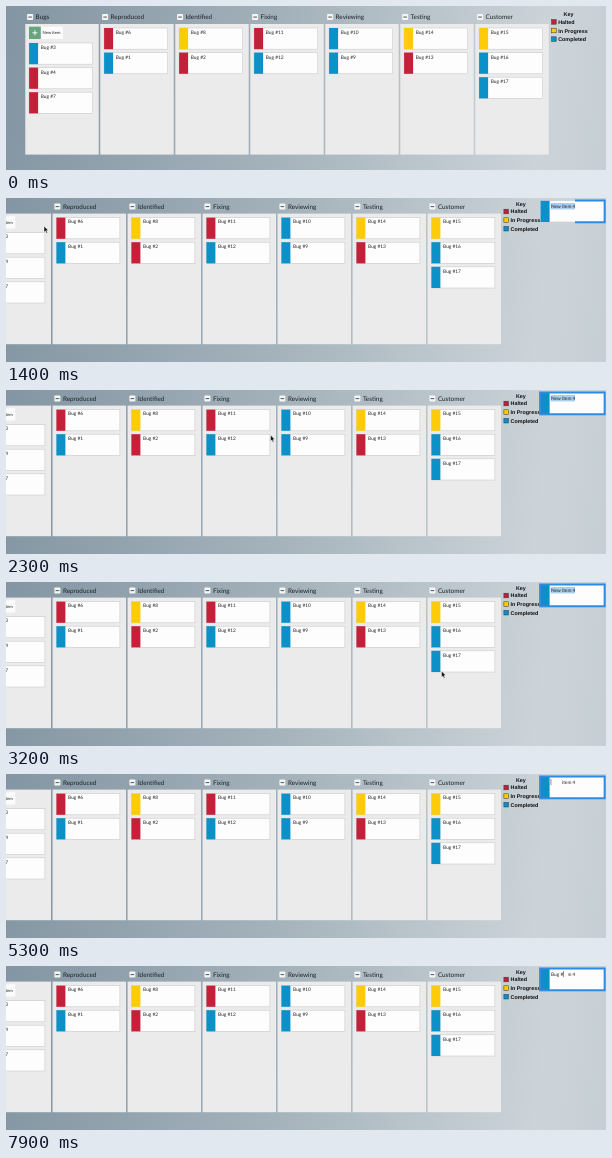
Animation, 600 px wide and 164 px high, one loop 8 s. Source, as an HTML page:

```html
<!DOCTYPE html>
<html lang="en">
<head>
<meta charset="utf-8">
<title>Bug board</title>
<style>
  html, body { margin: 0; width: 100%; height: 100%; overflow: hidden; }
  svg { display: block; width: 600px; height: 164px; }
  text { font-family: Lato, sans-serif; font-size: 4.8px; fill: #222; white-space: pre; text-rendering: geometricPrecision; }
  .head { font-size: 6.35px; fill: #1c2228; }
  .small { font-size: 4.2px; }
  .key { font: bold 5.4px "Liberation Sans", Arial, sans-serif; fill: #111; }
</style>
</head>
<body>
<svg id="stage" viewBox="0 0 600 164">
  <defs>
    <linearGradient id="sky" gradientUnits="userSpaceOnUse" x1="0" y1="30" x2="600" y2="100">
      <stop offset="0" stop-color="#8496a3"/>
      <stop offset=".45" stop-color="#a3b1ba"/>
      <stop offset=".9" stop-color="#ccd4d9"/>
      <stop offset="1" stop-color="#c6cfd4"/>
    </linearGradient>
    <clipPath id="rightPart"><rect x="569" y="0" width="31" height="30"/></clipPath>
  </defs>
  <rect width="600" height="164" fill="url(#sky)"/>
</svg>
<script>
const COLORS = { r: '#c5203a', y: '#fdcb08', b: '#0c90c8' };
const LOOP = 8000, STEP = 100;
const stage = document.getElementById('stage');

function add(parent, tag, attrs, content) {
  const node = document.createElementNS('http://www.w3.org/2000/svg', tag);
  for (const name in attrs) node.setAttribute(name, attrs[name]);
  if (content) node.textContent = content;
  return parent.appendChild(node);
}
const box = (parent, x, y, width, height, fill, more) =>
  add(parent, 'rect', { x, y, width, height, fill, ...more });
const label = (parent, x, y, content, cls = '') =>
  add(parent, 'text', { x, y, class: cls }, content);

function card(parent, x, y, color) {
  box(parent, x, y, 63.5, 21.2, '#fdfdfd', { stroke: '#c9cbcd', 'stroke-width': .6 });
  box(parent, x, y, 9, 21.2, COLORS[color]);
}

const board = add(stage, 'g', {});
const columns = [
  ['Bugs', 'b3 r4 r7'], ['Reproduced', 'r6 b1'], ['Identified', 'y8 r2'],
  ['Fixing', 'r11 b12'], ['Reviewing', 'b10 b9'], ['Testing', 'y14 r13'],
  ['Customer', 'y15 b16 b17']
];
columns.forEach(([title, bugs], i) => {
  const x = 19.3 + i * 75;
  box(board, x, 18, 73.4, 130.6, '#ebebec');
  box(board, x + 1.8, 8, 6, 6, '#f4f5f6', { rx: .8 });
  box(board, x + 3, 10.6, 3.6, .9, '#444');
  label(board, x + 10.3, 13.2, title, 'head');
  bugs.split(' ').forEach((bug, row) => {
    const y = (i ? 22 : 37) + row * 24.6;
    card(board, x + 3.8, y, bug[0]);
    label(board, x + 15.5, y + 5.9, 'Bug #' + bug.slice(1));
  });
});
box(board, 23, 20.6, 34, 12.4, '#fbfbfb');
box(board, 23, 20.6, 11.8, 12.4, '#66a57f');
add(board, 'path', { d: 'M26.4 26.8h5M28.9 24.3v5', stroke: '#fff', 'stroke-width': .9 });
label(board, 36.6, 28.2, 'New item', 'small');

label(board, 557.6, 10.2, 'Key', 'key');
[['r', 'Halted'], ['y', 'In Progress'], ['b', 'Completed']].forEach(([color, name], i) => {
  const y = 13.6 + i * 8.6;
  box(board, 545.6, y, 4.6, 4.6, COLORS[color], { stroke: '#333', 'stroke-width': .5 });
  label(board, 552.2, y + 4.3, name, 'key');
});

// The card being edited
const editor = add(stage, 'g', {});
card(editor, 534.6, 2.8, 'b');
const frame = box(editor, 534.1, 2.5, 64.6, 21.8, 'none', { stroke: '#2f8be6', 'stroke-width': 2 });
const selection = box(editor, 544.6, 5, 24.4, 6.4, '#a9cdf3');
label(editor, 545, 10.1, 'New item 4');
const eraser = box(editor, 544.4, 4.6, 0, 7, '#fdfdfd');
const typed = label(editor, 545, 10.1, '');
const caret = box(editor, 0, 5, .7, 6.2, '#5d6a62');

const pointer = add(stage, 'path', {
  d: 'M0 0V6.2L1.4 5 2.4 7.2 3.5 6.7 2.5 4.6H4.4Z',
  fill: '#111', stroke: '#fff', 'stroke-width': .5
});

const pointerPath = [
  [100, 248, 0], [300, 150, 14], [500, 66, 30], [700, 36, 33], [900, 36, 33],
  [1200, 37.5, 27], [1300, 37.5, 27], [1400, 38, 28], [1600, 38, 28],
  [2000, 145, 35], [2300, 264.5, 45], [2500, 326, 59], [2600, 331, 62],
  [2700, 331, 62], [3000, 402, 80], [3200, 435.5, 89], [3800, 435.5, 89]
];
const typing = [[0, ''], [5900, 'B'], [6000, 'Bu'], [6200, 'Bug'], [7600, 'Bug '], [7900, 'Bug #']];
const erasing = [[0, 0], [3800, 11], [5900, 13.5], [6200, 17.6]];
const caretOn = [[0, false], [3800, true], [4300, false], [4700, true], [6600, false], [6900, true], [7200, false], [7600, true]];

const held = (table, t) => table.filter(([time]) => time <= t).pop()[1];
const show = (node, on) => node.setAttribute('visibility', on ? 'visible' : 'hidden');

function pointerAt(t) {
  const i = pointerPath.findIndex(([time]) => time > t);
  if (i < 1) return null;
  const [t0, x0, y0] = pointerPath[i - 1], [t1, x1, y1] = pointerPath[i];
  const k = (t - t0) / (t1 - t0);
  return [x0 + (x1 - x0) * k, y0 + (y1 - y0) * k];
}

function render(t) {
  const scrolled = t >= 1400;
  board.setAttribute('transform', scrolled ? 'translate(-47.7 -2.4)' : '');
  editor.setAttribute('display', scrolled ? 'inline' : 'none');
  frame.setAttribute('clip-path', t < 1500 ? 'url(#rightPart)' : 'none');
  show(selection, t < 3800);
  eraser.setAttribute('width', held(erasing, t));
  typed.textContent = held(typing, t);
  show(caret, held(caretOn, t));
  caret.setAttribute('x', 544.6 + (typed.textContent ? typed.getComputedTextLength() + .3 : 0));
  const spot = pointerAt(t);
  show(pointer, spot);
  if (spot) pointer.setAttribute('transform', `translate(${spot})`);
}

const start = performance.now();
function tick() {
  const t = (performance.now() - start) % LOOP;
  render(Math.floor(t / STEP) * STEP);
  requestAnimationFrame(tick);
}
tick();
</script>
</body>
</html>
```
